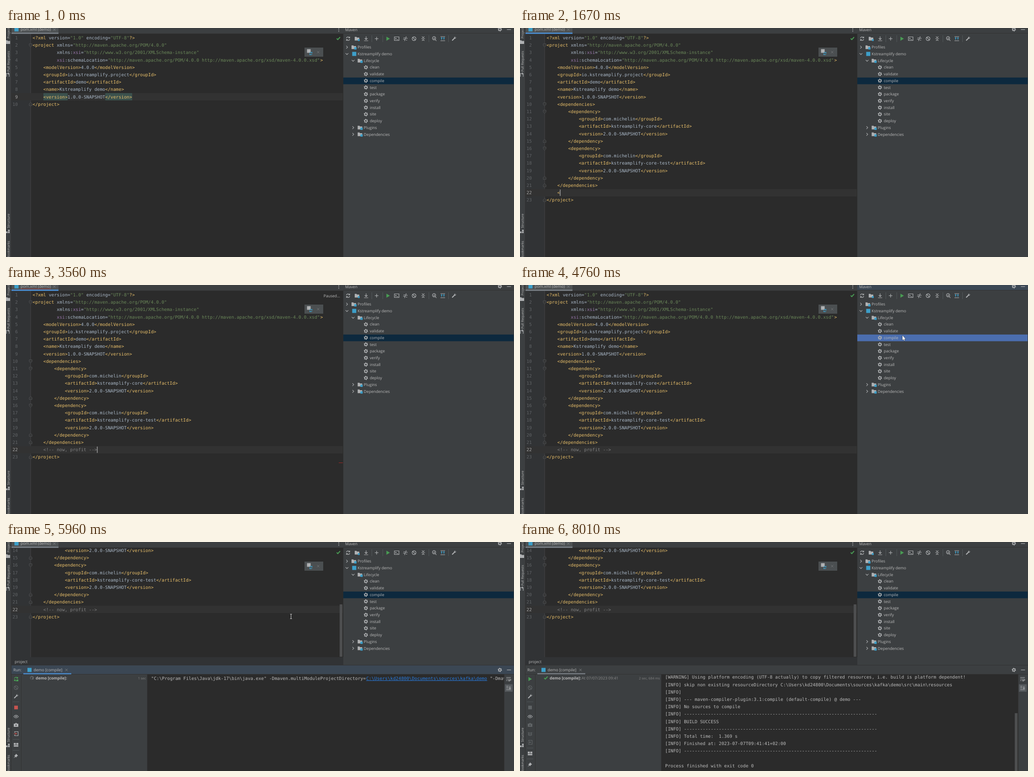
An HTML page with a canvas for the animation above (8.08 s loop, 1113 by 503 pixels).

```html
<!DOCTYPE html>
<html lang="en">
<head>
<meta charset="utf-8">
<title>Maven demo</title>
<style>
html, body { margin: 0; width: 100%; height: 100%; overflow: hidden; background: #3c3f41; }
canvas { display: block; }
</style>
</head>
<body>
<canvas id="stage" width="1113" height="503"></canvas>
<script>
const g = document.getElementById('stage').getContext('2d');
const LOOP = 8080, CHAR = 5.89, ROW = 16.2;
const MONO = '9.783px "DejaVu Sans Mono", monospace';
const UI = '8.6px "Open Sans", sans-serif', BOLD = 'bold ' + UI;
const SMALL = '7.4px "Open Sans", sans-serif';
const PANEL = '#3c3f41', EDITOR = '#2b2b2b', EDGE = '#323232', GREY = '#afb1b3', DIM = '#5f6365';
const TEXT = '#bbbbbb', BLUE = '#4a88c7', SKY = '#3d9fc9', GREEN = '#499c54', RED = '#c75450';
const ACTIVE = '#3b4754', IDLE = '#747a80';

// Key moments in ms
const T = { enter: 950, paste: 1200, next: 1400, open: 1600, error: 1900, fixed: 3800,
  click: 4400, run: 4900, tools: 5150, second: 5440, done: 7050, exit: 7330, blur: 7600 };

const ICONS = {
  refresh: 'M-3.8-1A4 4 0 0 1 3-2.6M3.8 1A4 4 0 0 1-3 2.6M3.6-4.6V-1.8H.8M-3.6 4.6V1.8H-.8',
  folder: 'M-5-4H-1L0-2.5H5V4H-5Z',
  download: 'M0-5V2M-3-1L0 2 3-1M-4.5 4.5H4.5',
  plus: 'M-4 0H4M0-4V4',
  play: 'M-3.5-4.5L4 0-3.5 4.5Z',
  terminal: 'M-5-4H5V4H-5ZM-3-1.5L-1 0-3 1.5M0 2H3',
  skip: 'M-5 1H-1M1-1H5M2-5L-2 5M-4-2H-1M1 3H4',
  no: 'M4.2 0A4.2 4.2 0 1 1-4.2 0 4.2 4.2 0 1 1 4.2 0M-3-3L3 3',
  collapse: 'M-4 0H4M-2.5-4.5L0-2 2.5-4.5M-2.5 4.5L0 2 2.5 4.5',
  search: 'M3.5-1A3.6 3.6 0 1 1-3.7-1 3.6 3.6 0 1 1 3.5-1M2.5 1.8L5 5M-1.2 1V-1M.8 1V-2.5',
  bars: 'M-5-4.5H5M-5 4.5H5',
  arrows: 'M-2.5-2.5V2.5M2.5-2.5V2.5M-4-1L-2.5-2.5-1-1M1-1L2.5-2.5 4-1',
  wrench: 'M-4.8 3.2L0-1.4A3.2 3.2 0 0 1 3.4-4.8L1.7-2.9 2.9-1.7 4.8-3.4A3.2 3.2 0 0 1 1.4 0L-3.2 4.8Z',
  right: 'M-1.5-3L1.5 0-1.5 3',
  down: 'M-3-1.5L0 1.5 3-1.5',
  check: 'M-3.5 0L-1 2.5 4-3',
  cross: 'M-2.5-2.5L2.5 2.5M2.5-2.5L-2.5 2.5',
  minus: 'M-4.5 0H4.5',
  stop: 'M-4-4H4V4H-4Z',
  eye: 'M-5 0Q0-6.5 5 0Q0 6.5-5 0M1 0A1 1 0 1 1-1 0 1 1 0 1 1 1 0',
  camera: 'M-5-3H-2L-1-4.5H1L2-3H5V4H-5ZM1.2.5A1.2 1.2 0 1 1-1.2.5 1.2 1.2 0 1 1 1.2.5',
  frame: 'M-3-2V-4.5H4.5V4.5H-3V2',
  into: 'M-5 0H1M-1-2L1 0-1 2',
  bug: 'M-2.5-2H2.5V3L0 4.5-2.5 3ZM-4.5-3L-2.5-1M4.5-3L2.5-1M-5 1H5M-4 4L-2.5 3M4 4L2.5 3',
  layout: 'M-5-4H-.5V0H-5ZM.5-4H5V0H.5ZM-5 1H5V4H-5Z',
  pin: 'M0-4.5L4.5 0 3 .5 1 2.5 .5 4-1.3 2.2-4.8 5-5 4.8-2.2 1.3-4-.5-2.5-1-.5-3Z',
  wrap: 'M-5-3.5H5M-5 0H3.5Q5 0 5 1.7T3.5 3.5H0M2 1.8L0 3.5 2 5M-5 3.5H-2',
  toEnd: 'M-5-3.5H0M-5 0H0M-5 4H5M3-4V2M1 .2L3 2 5 .2',
  branch: 'M-3-4V4M-3-3H3V4M0-3L2-5M0-3L2-1',
  blocks: 'M-4 0H-.5V3.5H-4ZM.5 0H4V3.5H.5ZM.5-4H4V-.5H.5Z',
  arrow: 'M0 0V10L2.3 8 3.8 11.2 5.2 10.5 3.8 7.5H6.8Z',
  beam: 'M-2-5H2M0-5V5M-2 5H2'
};
for (const k in ICONS) ICONS[k] = new Path2D(ICONS[k]);

function rect(x, y, w, h, c) { g.fillStyle = c; g.fillRect(x, y, w, h); }

function text(s, x, y, c = TEXT, font = UI, align = 'left') {
  g.font = font; g.fillStyle = c; g.textAlign = align;
  g.fillText(s, x, y + (font === MONO ? 3.4 : 3));
}

function stroke(name, x, y, c = GREY, width = 1.2) {
  g.save(); g.translate(x, y);
  g.strokeStyle = c; g.lineWidth = width; g.stroke(ICONS[name]);
  g.restore();
}

function solid(name, x, y, c = GREY) {
  g.save(); g.translate(x, y);
  g.fillStyle = c; g.fill(ICONS[name], 'evenodd');
  g.restore();
}

function gear(x, y) {
  g.strokeStyle = GREY;
  for (const [r, w, dash] of [[2.6, 1.6, []], [3.9, 1.3, [2.04, 2.04]]]) {
    g.lineWidth = w; g.setLineDash(dash);
    g.beginPath(); g.arc(x, y, r, 0, 2 * Math.PI); g.stroke();
  }
  g.setLineDash([]);
}

function mark(x, y, c = SKY, size = 9) { rect(x - size / 2, y - size / 2, size, size, c); }

function clip(x, y, w, h, draw) {
  g.save(); g.beginPath(); g.rect(x, y, w, h); g.clip();
  draw(); g.restore();
}

// Document
const tag = (name, value) => `<${name}>${value}</${name}>`;
const dependency = id => ['<dependency>',
  '    ' + tag('groupId', 'com.michelin'),
  '    ' + tag('artifactId', id),
  '    ' + tag('version', '2.0.0-SNAPSHOT'),
  '</dependency>'].map(s => '        ' + s);
const HEAD = [
  '<?xml version="1.0" encoding="UTF-8"?>',
  '<project xmlns="http://maven.apache.org/POM/4.0.0"',
  '         xmlns:xsi="http://www.w3.org/2001/XMLSchema-instance"',
  '         xsi:schemaLocation="http://maven.apache.org/POM/4.0.0 http://maven.apache.org/xsd/maven-4.0.0.xsd">',
  ...[['modelVersion', '4.0.0'], ['groupId', 'io.kstreamplify.project'], ['artifactId', 'demo'],
    ['name', 'Kstreamplify demo'], ['version', '1.0.0-SNAPSHOT']].map(p => '    ' + tag(...p))
];
const DEPS = ['    <dependencies>', ...dependency('kstreamplify-core'),
  ...dependency('kstreamplify-core-test'), '    </dependencies>'];
const COMMENT = '<!-- now, profit -->';

function documentAt(t) {
  const lines = [...HEAD];
  if (t >= T.paste) lines.push(...DEPS);
  else if (t >= T.enter) lines.push('    ');
  if (t >= T.next) {
    const n = Math.max(1, Math.min(20, Math.floor((t - 2510) / 76 + 7)));
    lines.push('    ' + (t >= T.open ? COMMENT.slice(0, n) : ''));
  }
  const current = lines.length - 1;
  lines.push('</project>');
  return { lines, current };
}

function codeLine(s, y, grey) {
  let col = 0;
  const parts = grey ? [s] : s.match(/"[^"]*"|<[\/?]?\w*|\??>|xsi|[^"<>?x]+|./g) || [];
  for (const p of parts) {
    const c = grey ? '#808080' : p[0] === '"' ? '#6a8759' : /[<>]/.test(p) ? '#e8bf6a'
      : p === 'xsi' ? '#9876aa' : '#a9b7c6';
    text(p, 58.3 + col * CHAR, y, c, MONO);
    col += p.length;
  }
}

function foldMark(y, end) {
  const d = end ? -1 : 1, c = '#5c5f61';
  g.beginPath();
  [[-3, -3], [3, -3], [3, 1], [0, 3.6], [-3, 1]].forEach(([x, v]) => g.lineTo(54 + x, y + v * d));
  g.closePath();
  g.fillStyle = EDITOR; g.fill();
  g.strokeStyle = c; g.lineWidth = 0.8; g.stroke();
  rect(52.5, y - 0.4, 3, 0.8, c);
}

function editor(t) {
  const open = t >= T.run, bottom = open ? 253 : 503;
  const focused = t >= T.enter && t < T.click;
  rect(11, 13, 728, bottom - 13, EDITOR);
  rect(11, 13, 43, bottom - 13, '#313335');
  rect(53.6, 13, 0.8, bottom - 13, '#4b4d4f');
  clip(11, 13, 728, bottom - 13, () => {
    const { lines, current } = documentAt(t);
    const top = open ? -192.1 : 21.6;
    lines.forEach((s, i) => {
      const y = top + i * ROW, here = i === current, rowTop = Math.round(y - 8);
      if (here) rect(11, rowTop, 727, 16, EDGE);
      if (i === 8 && here) {
        rect(82, rowTop, 9 * CHAR, 16, '#3b514d');
        rect(217.5, rowTop, 10 * CHAR, 16, '#3b514d');
      }
      text(i + 1, 26, y, here ? '#a4a3a3' : '#606366', MONO, 'right');
      if (/^ *<(project |dependencies>|dependency>)/.test(s)) foldMark(y, false);
      if (/^ *<\/(project|dependencies|dependency)>/.test(s)) foldMark(y, true);
      const note = lines[current].trim();
      const unclosed = i > current && note.startsWith('<!--') && !note.endsWith('-->');
      codeLine(s, y, s.includes('<!') || unclosed);
      if (here && focused) rect(58.3 + s.length * CHAR - 0.3, y - 7, 1.2, 14, TEXT);
    });
  });
  const paused = t >= T.error && t < T.fixed;
  if (paused) {
    text('Paused...', 732, 23.5, TEXT, UI, 'right');
    rect(729, 390, 9, 1, '#9e2927');
  } else stroke('check', 728, 23, GREEN, 2);

  rect(654, 43, 41, 20, '#4b4f51');
  mark(663.5, 50.5, GREY, 8);
  g.save(); g.translate(668, 56); g.scale(0.7, 0.7); stroke('refresh', 0, 0, SKY, 1.6); g.restore();
  stroke('cross', 684, 53, '#6e7173', 1);

  rect(11, 0, 728, 12, PANEL);
  rect(11, 12, 728, 1, EDGE);
  rect(11, 0, 104, 10, '#4e5254');
  rect(11, 10, 104, 3, focused ? BLUE : IDLE);
  mark(23, 3, SKY);
  text('pom.xml (demo)', 32, 3);
  stroke('cross', 106, 3.5, '#7d8082', 1);
  if (paused) {
    g.beginPath();
    for (let x = 32; x <= 98; x += 2) g.lineTo(x, x % 4 ? 9.2 : 7.8);
    g.strokeStyle = '#bc3f3c'; g.lineWidth = 0.9; g.stroke();
  }
  for (const y of [0, 3.3, 6.6]) rect(728.3, y, 1.6, 1.6, GREY);

  if (open) {
    rect(731, 137, 6, 115, '#4d4e4f');
    rect(11, 253, 728, 18, '#313335');
    text('project', 19, 262.5);
  }
}

function sideBar() {
  rect(0, 0, 11, 503, PANEL);
  rect(11, 0, 1, 503, EDGE);
  for (const [s, y] of [['Project', 23], ['Pull Requests', 96], ['Structure', 439.5], ['Bookmarks', 506]]) {
    g.save(); g.translate(4.5, y); g.rotate(-Math.PI / 2);
    text(s, 0, 0, TEXT, '7.3px "Open Sans", sans-serif');
    g.restore();
  }
  solid('folder', 4, 31);
  stroke('branch', 4, 103);
  solid('blocks', 4, 447);
}

function mavenPanel(t) {
  const focused = t >= T.click && t < T.run;
  rect(738, 0, 375, 503, PANEL);
  rect(738, 0, 1, 503, EDGE);
  if (focused) rect(739, 0, 374, 11, ACTIVE);
  rect(739, 11, 374, 1, EDGE);
  text('Maven', 743, 3.5);
  gear(1082, 3); stroke('minus', 1102, 3.5);

  const y = 23.5;
  stroke('refresh', 749.5, y); solid('folder', 769, y); mark(773, y + 3, SKY, 4);
  for (const [name, x] of [['download', 789], ['plus', 812], ['terminal', 856], ['skip', 875],
    ['no', 894], ['collapse', 914], ['search', 938], ['bars', 957]]) stroke(name, x, y);
  solid('wrench', 981.5, y);
  solid('play', 837, y, GREEN);
  stroke('arrows', 957, y, SKY);
  for (const x of [801, 825, 926, 969]) rect(x, 16, 1, 15, '#515658');

  rect(739, 108.8, 373, 14.7, focused ? '#4b6eaf' : '#0d293e');
  const rows = ['Profiles', 'Kstreamplify demo', 'Lifecycle', 'clean', 'validate', 'compile', 'test',
    'package', 'verify', 'install', 'site', 'deploy', 'Plugins', 'Dependencies'];
  rows.forEach((s, i) => {
    const y = 42.2 + i * 14.72;
    if (i > 2 && i < 12) { gear(788.5, y); text(s, 797, y); return; }
    const x = i < 2 ? 747 : 760.5;
    stroke(i === 1 || i === 2 ? 'down' : 'right', x, y, GREY, 1.1);
    if (i === 1) mark(763, y);
    else { solid('folder', x + 15, y); mark(x + 18.5, y + 2.5, SKY, 5); }
    text(s, x + 23.3, y);
  });
}

// Build output: [time, line]
const DASHES = '-'.repeat(72), HOME = 'C:\\Users\\kd24800\\Documents\\sources\\kafka\\demo';
const OUTPUT = [
  [T.run, '"C:\\Program Files\\Java\\jdk-17\\bin\\java.exe" -Dmaven.multiModuleProjectDirectory='],
  [6050, 'Scanning for projects...'],
  [6200, ''],
  [6200, `${'-'.repeat(20)}< io.kstreamplify.project:demo >${'-'.repeat(20)}`],
  [6200, 'Building Kstreamplify demo 1.0.0-SNAPSHOT'],
  [6200, `${'-'.repeat(32)}[ jar ]${'-'.repeat(33)}`],
  [6350, ''],
  [6480, '--- maven-resources-plugin:2.6:resources (default-resources) @ demo ---'],
  [6600, '[WARNING] Using platform encoding (UTF-8 actually) to copy filtered resources, i.e. build is platform dependent!'],
  [6600, `skip non existing resourceDirectory ${HOME}\\src\\main\\resources`],
  [6800, ''],
  [6800, '--- maven-compiler-plugin:3.1:compile (default-compile) @ demo ---'],
  ...['No sources to compile', DASHES, 'BUILD SUCCESS', DASHES, 'Total time:  1.369 s',
    'Finished at: 2023-07-07T09:41:41+02:00', DASHES].map(s => [7190, s]),
  [T.exit, ' '],
  [T.exit, 'Process finished with exit code 0']
];

function consoleView(t) {
  const shown = OUTPUT.filter(([at]) => t >= at), n = shown.length;
  const scroll = n > 12 ? (n - 1) * ROW - 192 : 0;
  shown.forEach(([, s], i) => {
    const y = 299.4 + i * ROW - scroll;
    const plain = i === 0 || i > 18 || s[0] === '[';
    text(plain ? s : '[INFO] ' + s, 318, y, TEXT, MONO);
    if (i === 0) {
      const x = 318 + 80 * CHAR, w = HOME.length * CHAR;
      text(HOME, x, y, '#287bde', MONO);
      rect(x, Math.round(y + 4.6), w, 1, '#287bde');
      text(' "-Dmaven.home', x + w, y, TEXT, MONO);
    }
  });
  if (n === 12) rect(318, 487, 1.2, 12, TEXT);
  if (scroll) rect(1084, 376, 6, 127, '#4d4e4f');
}

function spinner(x, y, t) {
  for (let i = 0; i < 8; i++) {
    const a = i * Math.PI / 4, c = Math.cos(a), s = Math.sin(a);
    g.globalAlpha = 0.25 + 0.75 * ((i + 8 - Math.floor(t / 80) % 8) % 8) / 7;
    g.beginPath(); g.moveTo(x + 2 * c, y + 2 * s); g.lineTo(x + 4.4 * c, y + 4.4 * s);
    g.strokeStyle = GREY; g.lineWidth = 1.1; g.stroke();
  }
  g.globalAlpha = 1;
}

function runTools(t) {
  const x = 22, over = t >= T.exit, tone = over ? DIM : GREY, shift = over ? 19 : 0;
  if (over) solid('play', x, 301, GREEN);
  else { stroke('refresh', x, 301, GREEN, 1.4); mark(x + 3, 304, GREEN, 4); }
  stroke('no', x, 320, DIM);
  solid('wrench', x, 339);
  solid('stop', x, 363.5, over ? DIM : RED);
  stroke('eye', x, 383.5);
  solid('camera', x, 402, tone);
  if (over) stroke('bug', x, 421, DIM);
  stroke('frame', x, 421 + shift, tone);
  stroke('into', x, 421 + shift, over ? DIM : RED);
  solid('layout', x, 445.5 + shift);
  solid('pin', x, 469.5 + shift);
  for (const y of [350.5, 433 + shift, 457 + shift]) rect(15, y, 14, 1, '#515658');
}

function runPanel(t) {
  const focused = t < T.blur;
  rect(11, 270, 1102, 233, PANEL);
  rect(11, 270, 1102, 1, EDGE);
  rect(11, 271, 1102, 19, focused ? ACTIVE : PANEL);
  rect(11, 290, 1102, 1, EDGE);
  text('Run:', 16, 281);
  mark(51.5, 281);
  text('demo [compile]', 60.5, 281);
  stroke('cross', 132.5, 281, '#7d8082', 1);
  rect(38, 288, 105, 2.6, focused ? BLUE : IDLE);
  gear(1082, 281); stroke('minus', 1102, 281);

  rect(33, 291, 1, 212, EDGE);
  rect(309, 291, 1, 212, EDGE);
  rect(310, 291, 781, 212, EDITOR);
  clip(310, 291, 781, 212, () => consoleView(t));
  rect(1091, 291, 1, 212, EDGE);
  stroke('wrap', 1101, 301);
  rect(1093, 312.5, 17, 16.5, '#55595c');
  stroke('toEnd', 1101, 320.5);

  if (t >= T.tools) runTools(t);
  const done = t >= T.done;
  if (done) stroke('check', 56.5, 298.5, GREEN, 2);
  else spinner(56.5, 298.5, t);
  text('demo [compile]:', 65, 298.5, TEXT, BOLD);
  if (done) text('At 07/07/2023 09:41', 135, 298.5, '#8c8c8c');
  text(done ? '2 sec, 684 ms' : t < T.second ? '0 sec' : '1 sec', 306.5, 298.5, '#808080', SMALL, 'right');
}

// Pointer legs: start time and place, end time and place
const LEGS = [
  [70, 674, 301, 820, 303, 151],
  [T.enter],
  [3680, 303, 151, 4300, 838, 111],
  [5560, 838, 111, 5960, 625, 163],
  [5960, 625, 163, 6350, 560, 203],
  [6500, 560, 203, 7100, 518, 225],
  [7250, 518, 225, 7700, 470, 515]
];

function pointer(t) {
  const leg = LEGS.filter(l => t >= l[0]).pop();
  if (!leg || leg.length < 2) return;
  const [t0, x0, y0, t1, x1, y1] = leg;
  const p = Math.min(1, (t - t0) / (t1 - t0)), e = p * p * (3 - 2 * p);
  const x = x0 + (x1 - x0) * e, y = y0 + (y1 - y0) * e;
  if (x > 738 || (t >= T.run && y > 253 && y < 291)) {
    stroke('arrow', x, y, '#222', 1);
    solid('arrow', x, y, '#fff');
  } else stroke('beam', Math.floor(x) + 0.5, Math.floor(y) + 0.5, '#d0d0d0', 1);
}

function draw(now) {
  const t = now % LOOP;
  g.textRendering = 'geometricPrecision';
  mavenPanel(t);
  editor(t);
  if (t >= T.run) runPanel(t);
  sideBar();
  pointer(t);
  requestAnimationFrame(() => draw(performance.now()));
}
draw(0);
</script>
</body>
</html>
```
